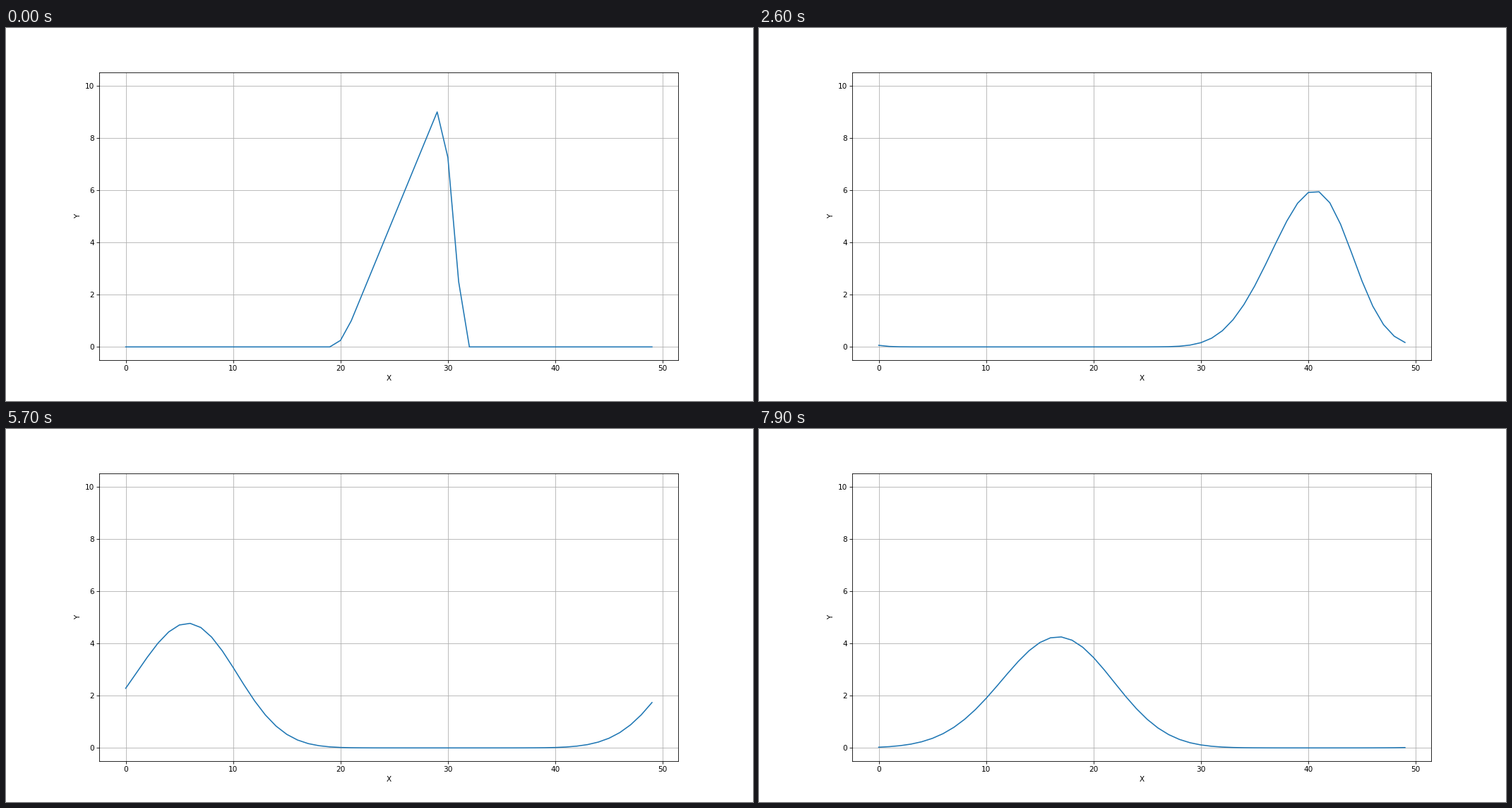
Animation, 1058 px wide and 529 px high, one loop 8000 ms. Source, as a matplotlib script:

```python
import numpy as np
import matplotlib.pyplot as plt
from matplotlib.animation import FuncAnimation

WIDTH, HEIGHT = 1058, 529
FRAMES, INTERVAL = 80, 100
POINTS = 50
COURANT = 0.5
FIRST_STEP = 2

x = np.arange(POINTS)
start = np.where((x >= 20) & (x < 30), x - 19.0, 0.0)


def advect(steps):
    """Upwind advection of the ramp on a periodic grid."""
    u = start.copy()
    for _ in range(steps):
        u -= COURANT * (u - np.roll(u, 1))
    return u


plt.rcParams["font.family"] = "DejaVu Sans"
dpi = WIDTH / 14
fig, ax = plt.subplots(figsize=(WIDTH / dpi, HEIGHT / dpi), dpi=dpi)
line, = ax.plot(x, start, color="#1f77b4", lw=1.5)
ax.set_xlim(-2.45, 51.45)
ax.set_ylim(-0.5, 10.5)
ax.set_xlabel("X")
ax.set_ylabel("Y")
ax.grid(True)


def update(frame):
    line.set_ydata(advect(frame + FIRST_STEP))
    return line,


anim = FuncAnimation(fig, update, frames=FRAMES, interval=INTERVAL,
                     init_func=lambda: update(0), repeat=True, repeat_delay=0)
plt.show()
```
